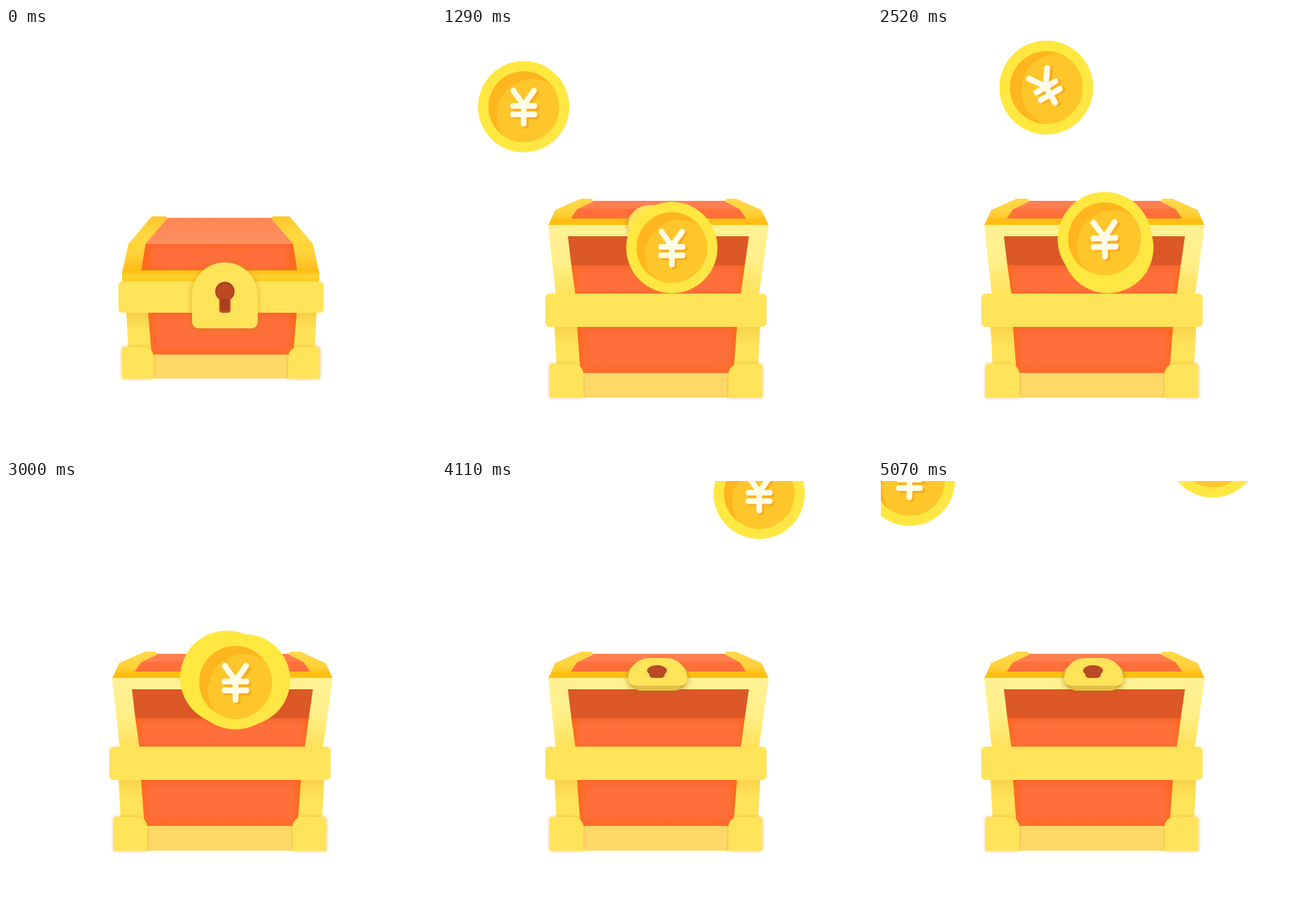
Write an HTML page with a canvas that moves like this. It is 608x600 px and loops after 5100 ms.

```html
<!DOCTYPE html>
<html lang="en">
<head>
<meta charset="utf-8">
<title>Treasure chest</title>
<style>
html, body { margin: 0; width: 100%; height: 100%; overflow: hidden; background: #fff; }
canvas { display: block; width: 608px; height: 600px; }
</style>
</head>
<body>
<canvas id="stage" width="608" height="600"></canvas>
<script>
const ctx = document.getElementById('stage').getContext('2d');
const LOOP = 5100, STEP = 30, OPEN = 19;
const GOLD = '#ffe359', BASE = '#ffd968', RED = '#ff6f3a';

function grad(x0, y0, x1, y1, ...colors) {
  const g = ctx.createLinearGradient(x0, y0, x1, y1);
  colors.forEach((c, i) => g.addColorStop(i / (colors.length - 1), c));
  return g;
}

function poly(fill, ...p) {
  ctx.beginPath();
  for (let i = 0; i < p.length; i += 2) ctx.lineTo(p[i], p[i + 1]);
  ctx.closePath();
  ctx.fillStyle = fill;
  ctx.fill();
}

function box(fill, x0, y0, x1, y1, r = 0) {
  ctx.beginPath();
  ctx.roundRect(x0, y0, x1 - x0, y1 - y0, r);
  ctx.fillStyle = fill;
  ctx.fill();
}

function disc(fill, x, y, r) {
  ctx.beginPath();
  ctx.arc(x, y, r, 0, Math.PI * 2);
  ctx.fillStyle = fill;
  ctx.fill();
}

function shaded(color, blur, dy, draw) {
  ctx.save();
  ctx.shadowColor = color;
  ctx.shadowBlur = blur;
  ctx.shadowOffsetY = dy;
  draw();
  ctx.restore();
}

// Red panel with a soft orange rim along its edges
function panel(x0, y0, x1, y1, inset) {
  poly(grad(0, y0, 0, y1, '#f9672f', RED, RED, RED, '#ff6a2a'),
    x0, y0, x1, y0, x1 - inset, y1, x0 + inset, y1);
  const rim = 'rgba(255,104,24,.75)', none = 'rgba(255,104,24,0)';
  poly(grad(x0 + 2, 0, x0 + 14, 0, rim, none), x0, y0, x0 + 14, y0, x0 + 14, y1, x0 + inset, y1);
  poly(grad(x1 - 2, 0, x1 - 14, 0, rim, none), x1, y0, x1 - 14, y0, x1 - 14, y1, x1 - inset, y1);
}

function feet(l, r, w, top, bottom) {
  shaded('rgba(225,150,20,.6)', 5, 0, () => {
    box(GOLD, l, top, l + w, bottom, [4, 15, 0, 2]);
    box(GOLD, r - w, top, r, bottom, [15, 4, 2, 0]);
  });
}

function closedChest() {
  // lid
  poly(grad(0, 268, 0, 305, '#ff8756', '#ff8e60'), 226, 268, 378, 268, 407, 305, 196, 305);
  panel(197, 305, 406, 343, -6);
  const strap = grad(0, 266, 0, 345, '#ffc62a', '#ffd83f', '#ffd23a', '#fdb915');
  poly(strap, 206, 266, 226, 266, 228, 269, 197, 305, 191, 343, 164, 346, 173, 305);
  poly(strap, 401, 266, 377, 266, 375, 269, 406, 305, 412, 343, 443, 346, 434, 305);
  box(grad(0, 342, 0, 358, '#ffbd13', '#ffd22c', '#ffcb22'), 164, 342, 443, 359, 3);

  // body
  poly(grad(0, 402, 0, 452, '#f7cf48', GOLD, GOLD), 170, 400, 439, 400, 437, 453, 173, 453);
  box(BASE, 165, 460, 443, 495);
  panel(201, 401, 411, 461, 5);
  feet(164, 444, 45, 450, 495);
  box(GOLD, 159, 358, 449, 402, 5);

  // clasp
  shaded('rgba(190,120,10,.5)', 10, 1, () => box(GOLD, 263, 331, 356, 424, [46, 46, 9, 9]));
  disc('#a93f20', 309.5, 372, 13.7);
  box('#c14d27', 301.5, 376, 317.5, 402, [0, 0, 4, 4]);
  disc('#bd4923', 309.5, 373.5, 12);
  box('#a84020', 303.5, 382, 315.5, 399, 3);
}

function openChest() {
  // raised lid
  poly('#ff7e50', 208, 244, 405, 244, 424, 256, 188, 256);
  poly(RED, 190, 255, 421, 255, 431, 270, 181, 270);
  const strap = grad(0, 241, 0, 279, '#ffd94a', '#ffd23c', '#ffb90e');
  poly(strap, 196, 241, 212, 241, 214, 245, 191, 256, 182, 269, 182, 279, 150, 279, 160, 257);
  poly(strap, 416, 241, 402, 241, 400, 245, 421, 256, 430, 269, 430, 279, 462, 279, 452, 257);
  box('#ffbf12', 156, 269, 457, 279);

  // frame and interior
  poly(grad(0, 278, 0, 375, '#fff193', '#fff08a', '#ffe25a'), 150, 278, 462, 278, 448, 378, 161, 378);
  poly('#dc5826', 178, 294, 434, 294, 428, 336, 183, 336);
  panel(183, 335, 428, 378, 6);

  // lower body
  poly(grad(0, 422, 0, 476, '#f9d44c', GOLD, GOLD), 159, 420, 450, 420, 447, 477, 162, 477);
  box(BASE, 153, 486, 452, 522);
  panel(191, 421, 417, 487, 5);
  feet(152, 453, 48, 474, 522);
  box(GOLD, 146, 375, 459, 422, 6);

  // tilted clasp
  shaded('rgba(150,90,0,.5)', 8, 2, () => box('#d5ac38', 263, 262, 347, 293, [8, 8, 14, 14]));
  box('#e2bd48', 272, 288, 338, 296, [0, 0, 8, 8]);
  box(GOLD, 263, 250, 347, 289, [36, 36, 11, 11]);
  ctx.beginPath();
  ctx.ellipse(304, 267.5, 14, 7.6, 0, 0, Math.PI * 2);
  ctx.fillStyle = '#b84a24';
  ctx.fill();
  box('#b84a24', 293, 268, 315, 278, [0, 0, 5, 5]);
}

function yen(color, d) {
  ctx.beginPath();
  ctx.moveTo(d - 14.5, d - 22.5);
  ctx.lineTo(d, d - 2);
  ctx.lineTo(d + 14.5, d - 22.5);
  for (const y of [-1, 11]) {
    ctx.moveTo(d - 15, d + y);
    ctx.lineTo(d + 15, d + y);
  }
  ctx.moveTo(d, d - 2);
  ctx.lineTo(d, d + 24);
  ctx.strokeStyle = color;
  ctx.lineWidth = 8;
  ctx.lineCap = ctx.lineJoin = 'round';
  ctx.stroke();
}

function coin({ x, y, r = 64.5, turn = 0 }) {
  ctx.save();
  ctx.translate(x, y);
  ctx.rotate(turn * Math.PI / 180);
  ctx.scale(r / 64.5, r / 64.5);
  disc(grad(-40, -50, 40, 50, '#ffe73f', '#ffe93f', '#ffe646'), 0, 0, 64.5);
  disc('#ffb51e', 0, 0, 50);
  ctx.save();
  ctx.clip();
  disc('#ffc62c', 12, 11, 50);
  ctx.restore();
  yen('#f8ad1e', 3);
  yen('#fffde6', 0);
  ctx.restore();
}

// Each track: launch steps, flight length in steps, and place after n steps
const tracks = [
  {
    starts: [20, 34, 48, 62, 85, 105, 119, 138, 156], length: 13,
    at(n) {
      const m = Math.min(n, 9), rest = n - m;
      return {
        x: 325 - 28.81 * m + 0.6145 * m * m - 17.75 * rest,
        y: 310 - 16.22 * m - 0.6543 * m * m - 28 * rest
      };
    }
  },
  {
    starts: [23, 43, 69, 84, 99, 112, 127, 142, 157], length: 12,
    at: n => ({ x: 325 + 12.35 * n, y: 310 - 29.25 * n })
  },
  {
    starts: [28, 45, 76, 83, 98, 120, 145], length: 12,
    at(n) {
      const p = (n / 8) ** 1.4;
      return { x: 325 - 87 * p, y: 310 - 226 * p, r: 66.3, turn: -30 * p };
    }
  },
  {
    starts: [26, 59, 99, 114, 140], length: 15,
    at: n => ({ x: 324.5, y: 310 - 25.75 * n, r: 66.3 })
  }
];

function zoomed(s, x, y, draw) {
  ctx.save();
  ctx.translate(x, y);
  ctx.scale(s, s);
  ctx.translate(-x, -y);
  draw();
  ctx.restore();
}

function render(step) {
  ctx.fillStyle = '#fff';
  ctx.fillRect(0, 0, 608, 600);
  if (step < OPEN) {
    const pulse = Math.sin(step / OPEN * Math.PI * 2) ** 2;
    zoomed(1 - 0.04 * pulse, 304, 381, closedChest);
    return;
  }
  const grow = Math.min(1, (step - OPEN + 1) / 4);
  zoomed(0.94 + 0.06 * grow, 304, 400, openChest);

  ctx.save();
  ctx.beginPath();
  ctx.rect(4, 0, 600, 600);
  ctx.clip();
  for (const { starts, length, at } of tracks) {
    for (const s of starts) {
      const n = step - s;
      if (n >= 0 && n <= length) coin(at(n));
    }
  }
  ctx.restore();
}

const begin = performance.now();
function tick() {
  const t = (performance.now() - begin) % LOOP;
  render(Math.floor(t / STEP));
  requestAnimationFrame(tick);
}
tick();
</script>
</body>
</html>
```
